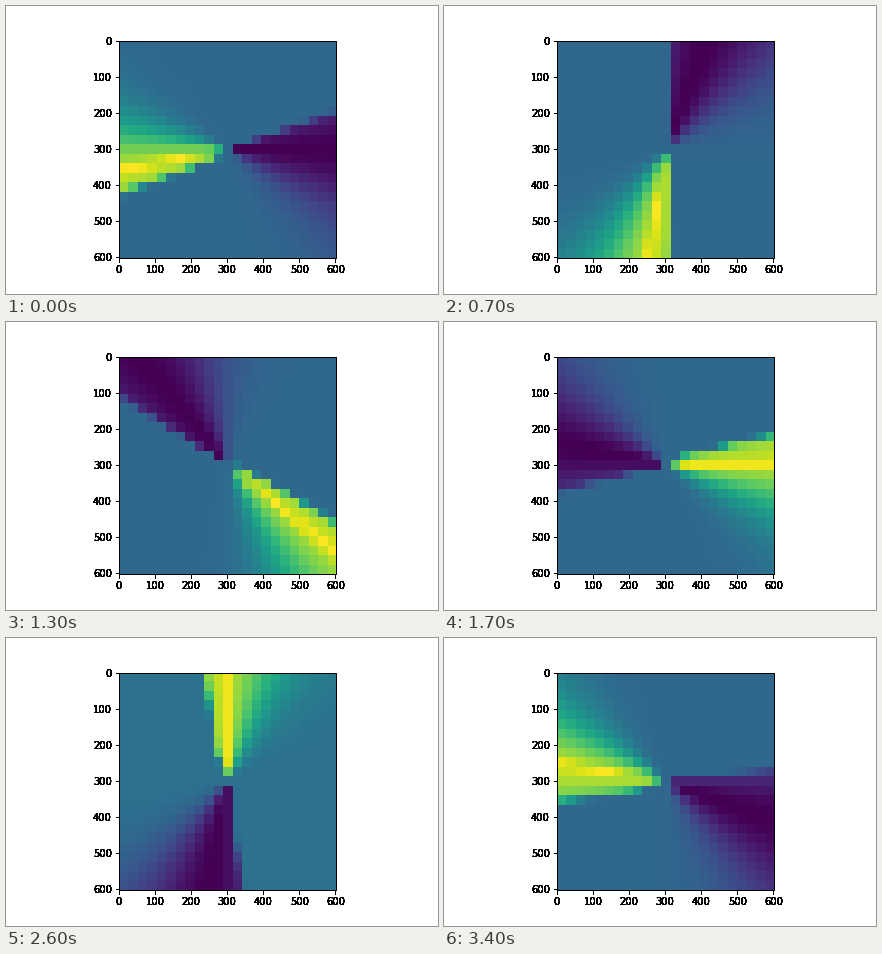
A matplotlib script for the animation above (3500 ms loop, 432x288 px).

```python
import numpy as np
import matplotlib.pyplot as plt
from matplotlib.animation import FuncAnimation

FRAMES, INTERVAL, STEP = 35, 100, 10
CELLS, SPAN = 23, 603
LOW, HIGH = -0.5, SPAN - 0.5

half = CELLS // 2
dy, dx = np.mgrid[half:-half - 1:-1, -half:half + 1]
radius = np.maximum(np.hypot(dx, dy), 1)
angle = np.degrees(np.arctan2(dy, dx))


def bell(x, center, width):
    return np.exp(-((x - center) / width) ** 2)


def wedge(edge, reach):
    """Degrees behind the leading edge, and a mask with a sharp front."""
    behind = (edge - angle + 60) % 360 - 60
    # the front runs ahead near the horizontal axis
    ahead = reach + 9 * np.cos(np.radians(edge)) ** 40
    return behind, 1 / (1 + np.exp(-(behind + ahead) / .8))


def field(n):
    turn = STEP * n
    behind, front = wedge(202 + turn, 36 / radius - 3)
    warm = front * (.84 * bell(behind, 8, 30) + .16 * bell(behind, 11, 3))
    warm *= np.minimum(1, .35 + .3 * radius)
    behind, front = wedge(17.5 + turn, 0)
    cold = front * bell(behind, 18, 33)
    warm[half, half] = cold[half, half] = 0
    # background is lightest while the warm lobe points up
    base = .335 + .04 * bell(turn, 260, 25)
    return np.clip(base + (1 - base) * warm - base * cold, 0, 1)


plt.rcParams.update({"font.family": "DejaVu Sans", "font.size": 10,
                     "figure.subplot.bottom": .125})
fig = plt.figure(figsize=(6, 4), dpi=72, facecolor="white")


def add_frame():
    ax = fig.add_subplot(facecolor="none")
    ticks = range(0, SPAN, 100)
    ax.set(xlim=(LOW, HIGH), ylim=(HIGH, LOW), aspect="equal",
           xticks=ticks, yticks=ticks)
    return ax


ax = add_frame()
image = ax.imshow(field(0), cmap="viridis", vmin=0, vmax=1,
                  interpolation="nearest", extent=(LOW, HIGH, HIGH, LOW))

# stacked copies give the labels and borders their heavy, dark edges
for _ in range(13):
    add_frame()


def update(n):
    image.set_data(field(n))
    return [image]


anim = FuncAnimation(fig, update, frames=FRAMES, interval=INTERVAL,
                     repeat=True, repeat_delay=0, blit=False)
plt.show()
```
